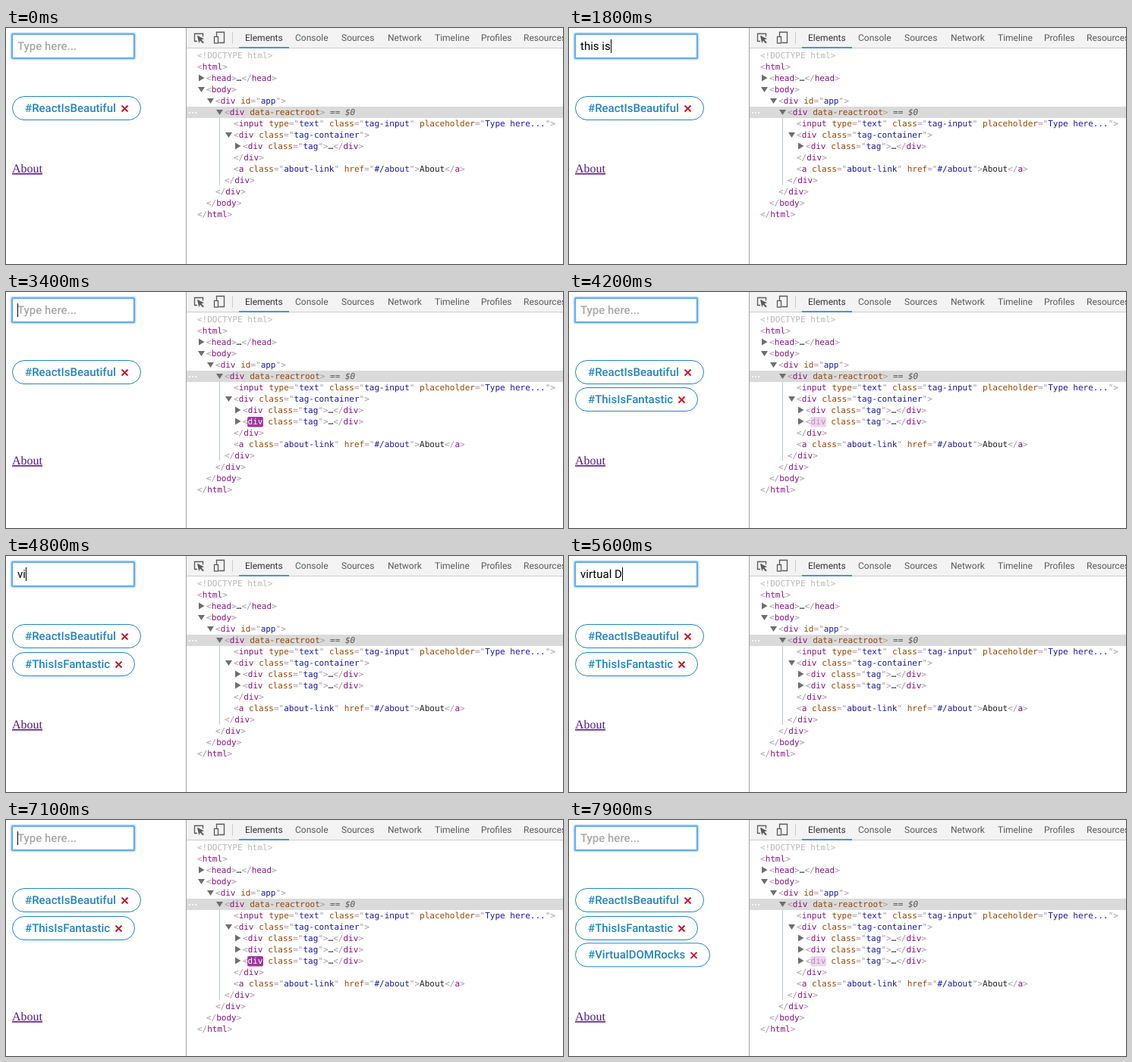
Write an HTML page that moves like this. It is 734 px wide and 312 px high and loops after 8 s.

```html
<!DOCTYPE html>
<html lang="en">
<head>
<meta charset="utf-8">
<title>Tags and DOM inspector</title>
<style>
  html, body { margin: 0; width: 100%; height: 100%; overflow: hidden; background: #fff; }
  svg { display: block; }
  text { white-space: pre; text-rendering: geometricPrecision; }
  .ui { font: 15px Roboto, sans-serif; }
  .strong { font-weight: 500; }
  .tab { font: 12px Roboto, sans-serif; fill: #5a5a5a; }
  .link { font: 16px "Liberation Serif", serif; fill: #551a8b; text-decoration: underline; }
  .code { font: 11px "DejaVu Sans Mono", monospace; fill: #222; }
  .punct { fill: #a894a6; }
  .name { fill: #881280; }
  .attr { fill: #994500; }
  .value { fill: #1a1aa6; }
</style>
</head>
<body>
<svg id="stage" width="734" height="312" viewBox="0 0 734 312"></svg>
<script>
const LOOP = 8000, CHAR = 6.62, ROW = 15;
const TAGS = [
  { label: '#ReactIsBeautiful', width: 169, added: -5000 },
  { label: '#ThisIsFantastic', width: 161, added: 3400 },
  { label: '#VirtualDOMRocks', width: 177, added: 7094 },
];
// Each phrase gains a letter every 100 ms, except at the pauses.
const PHRASES = [
  { text: 'this is fantastic', start: 1200, sent: 3400, pauses: [2300, 2500] },
  { text: 'virtual DOM rocks', start: 4700, sent: 7094, pauses: [5500, 6100, 6300] },
];
const CARET_ON = [[200, 700], [1200, 3900], [4400, 7600]];

const stage = document.getElementById('stage');
const escapeText = s => s.replace(/</g, '&lt;');
const span = (cls, s) => `<tspan class="${cls}">${escapeText(s)}</tspan>`;
const text = (cls, x, y, s, extra = '') => `<text class="${cls}" x="${x}" y="${y}" ${extra}>${s}</text>`;
const rect = (x, y, w, h, style) => `<rect x="${x}" y="${y}" width="${w}" height="${h}" ${style}/>`;
const path = (d, style) => `<path d="${d}" ${style}/>`;
const line = (color, width = 1) => `fill="none" stroke="${color}" stroke-width="${width}"`;
const mix = (a, b, p) => a.map((v, i) => v + (b[i] - v) * p);

function bezier(x1, y1, x2, y2) {
  const at = (a, b, s) => 3 * (1 - s) ** 2 * s * a + 3 * (1 - s) * s * s * b + s ** 3;
  return x => {
    let low = 0, high = 1;
    for (let i = 0; i < 24; i++) {
      const mid = (low + high) / 2;
      if (at(x1, x2, mid) < x) low = mid; else high = mid;
    }
    return at(y1, y2, low);
  };
}
const ease = bezier(.25, .1, .25, 1);
const easeOut = bezier(.215, .61, .355, 1);

// Bounce in from below: [time in ms, vertical offset]
const BOUNCE = [[0, 3000], [600, -20], [750, 10], [900, -5], [1000, 0]];
function bounceOffset(age) {
  for (let i = 1; i < BOUNCE.length; i++) {
    const [t0, y0] = BOUNCE[i - 1], [t1, y1] = BOUNCE[i];
    if (age < t1) return y0 + (y1 - y0) * easeOut((age - t0) / (t1 - t0));
  }
  return 0;
}

function typedText(t) {
  const phrase = PHRASES.find(p => t >= p.start && t < p.sent);
  if (!phrase) return '';
  const skipped = phrase.pauses.filter(p => p <= t).length;
  return phrase.text.slice(0, Math.floor((t - phrase.start) / 100) + 1 - skipped);
}

const measure = document.createElement('canvas').getContext('2d');
function drawInput(t) {
  const typed = typedText(t);
  measure.font = '15px Roboto, sans-serif';
  const caretX = 15 + measure.measureText(typed).width;
  const caret = CARET_ON.some(([from, to]) => t >= from && t < to);
  return rect(7.5, 7.5, 162, 33, `rx="2" ${line('#c3e0f8', 4)}`) +
    rect(8, 8, 161, 32, `rx="1.5" ${line('#65aeed', 2)}`) +
    (typed ? text('ui', 15, 29, typed) : text('ui strong', 15, 29, 'Type here...', 'fill="#a9a9a9"')) +
    (caret ? rect(Math.round(caretX), 15, 1, 18, 'fill="#000"') : '');
}

function drawTag({ label, width, added }, i, t) {
  const age = t - added;
  const crossX = width - 21;
  return `<g transform="translate(8.5 ${90.5 + 37 * i + bounceOffset(age)})" opacity="${easeOut(Math.min(1, age / 600))}">` +
    rect(0, 0, width, 31, `rx="15.5" fill="#fff" stroke="#2185c5"`) +
    text('ui strong', 16.5, 20.5, label, 'fill="#2185c5"') +
    path(`M${crossX - 4} 12l8 8m0-8l-8 8`, line('#d0112b', 1.9)) + '</g>';
}

const highlightCode = s => s.replace(
  /(<\/?)(\w+)|([\w-]+)="([^"]*)"|(data-\w+)|(>)/g,
  (_, open, name, attr, value, bare, close) =>
    name ? span('punct', open) + span('name', name)
    : attr ? span('attr', attr) + span('punct', '="') + span('value', value) + span('punct', '"')
    : bare ? span('attr', bare) : span('punct', close));

// Flash on the name of a freshly added node
function drawFlash(x, y, age) {
  if (age >= 1400) return '';
  const p = ease(Math.min(1, age / 1120));
  const fade = age > 1120 ? 1 - ease((age - 1120) / 280) : 1;
  const back = mix([158, 54, 153], [245, 219, 244], p);
  const front = mix([255, 255, 255], [168, 148, 166], p);
  return `<g opacity="${fade}">` + rect(x + CHAR - 0.5, y - 10, 3 * CHAR + 1, 13.5, `rx="2" fill="rgb(${back})"`) +
    text('code', x + CHAR, y, 'div', `style="fill:rgb(${front})"`) + '</g>';
}

function drawTree(tags, t) {
  // [depth, markup, arrow, time added]
  const rows = [
    [0, ''],
    [0, '<html>'],
    [1, '<head>…</head>', 'right'],
    [1, '<body>', 'down'],
    [2, '<div id="app">', 'down'],
    [3, '<div data-reactroot>', 'down'],
    [4, '<input type="text" class="tag-input" placeholder="Type here...">'],
    [4, '<div class="tag-container">', 'down'],
    ...tags.map(tag => [5, '<div class="tag">…</div>', 'right', tag.added]),
    [4, '</div>'],
    [4, '<a class="about-link" href="#/about">About</a>'],
    [3, '</div>'], [2, '</div>'], [1, '</body>'], [0, '</html>'],
  ];
  const guideEnd = 193 + ROW * tags.length;
  let out = rect(238, 104, 496, 15, 'fill="#dadada"') +
    [242, 246, 250].map(x => rect(x - 1, 111, 2, 2, 'fill="#fff"')).join('') +
    path(`M281.5 119V${guideEnd}`, line('#b4ccd2')) +
    text('code', 252, 40, '&lt;!DOCTYPE html>', 'style="fill:#b8b8b8"') +
    text('code', 288 + 21 * CHAR, 115, '== <tspan font-style="italic">$0</tspan>', 'style="fill:#555"');
  rows.forEach(([depth, markup, arrow, added], i) => {
    const x = 252 + 12 * depth, y = 40 + ROW * i;
    if (arrow === 'right') out += path(`M${x - 10} ${y - 8.5}l7.5 4.5l-7.5 4.5z`, 'fill="#6e6e6e"');
    if (arrow === 'down') out += path(`M${x - 11} ${y - 7}h9l-4.5 7z`, 'fill="#6e6e6e"');
    out += text('code', x, y, highlightCode(markup));
    if (added) out += drawFlash(x, y, t - added);
  });
  return out;
}

function drawToolbar() {
  const tabs = [['Elements', 315], ['Console', 381], ['Sources', 442], ['Network', 503],
    ['Timeline', 565], ['Profiles', 626], ['Resources', 682]];
  const icon = line('#5a5a5a', 1.3);
  return rect(238, 0, 496, 26, 'fill="#f3f3f3"') +
    rect(238, 26, 496, 1, 'fill="#ccc"') +
    rect(307, 25, 66, 2, 'fill="#4a90e2"') +
    rect(298, 5, 1, 16, 'fill="#ccc"') +
    path('M252 17.5h-3.5v-10h11v4', icon) +
    path('M252 10l9 4.2l-3.6 1.2l3.4 3.6l-1.5 1.4l-3.4-3.6l-1.7 3.2z', 'fill="#5a5a5a"') +
    path('M277.5 11v-5.5h10v14h-7', icon) +
    rect(274.5, 11.5, 5, 8.5, icon) +
    tabs.map(([name, x], i) => text('tab', x, 17, name, i ? '' : 'style="fill:#333"')).join('');
}

const toolbar = drawToolbar();
function render(t) {
  const tags = TAGS.filter(tag => t >= tag.added);
  stage.innerHTML = drawInput(t) +
    text('link', 8, 154 + 37 * tags.length, 'About') +
    tags.map((tag, i) => drawTag(tag, i, t)).join('') +
    rect(238, 0, 496, 312, 'fill="#fff"') +
    rect(237, 0, 1, 312, 'fill="#a3a3a3"') +
    toolbar + drawTree(tags, t);
}

function tick() {
  render(performance.now() % LOOP);
  requestAnimationFrame(tick);
}
tick();
</script>
</body>
</html>
```
